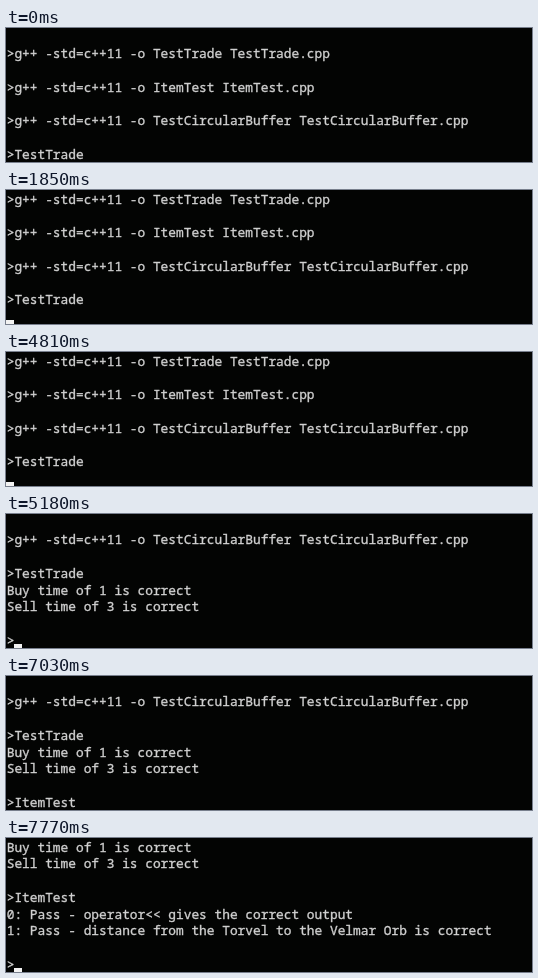
These frames come from a looping animation (526 by 134 pixels, 8 s). An HTML page:

```html
<!DOCTYPE html>
<html lang="en">
<head>
<meta charset="utf-8">
<title>Terminal session</title>
<style>
  html, body { margin: 0; width: 100%; height: 100%; overflow: hidden; background: #030403; }
  #screen {
    position: absolute; left: 0.7px; top: 0.5px; margin: 0;
    font: 12.83px/16.8px "Noto Sans Mono", "DejaVu Sans Mono", monospace;
    color: #d0d0d0; -webkit-text-stroke: 0.35px #d0d0d0; white-space: pre;
  }
  #cursor { position: absolute; top: 130px; width: 8px; height: 4px; background: #f2f2f2; }
</style>
</head>
<body>
<pre id="screen"></pre>
<div id="cursor"></div>
<script>
const LOOP = 8000, TICK = 370, ROWS = 8, CHAR_WIDTH = 7.7;

const transcript = [
  "",
  ">g++ -std=c++11 -o TestTrade TestTrade.cpp",
  "",
  ">g++ -std=c++11 -o ItemTest ItemTest.cpp",
  "",
  ">g++ -std=c++11 -o TestCircularBuffer TestCircularBuffer.cpp",
  "",
  ">TestTrade",
  "Buy time of 1 is correct",
  "Sell time of 3 is correct",
  "",
  ">ItemTest",
  "0: Pass - operator<< gives the correct output",
  "1: Pass - distance from the Torvel to the Velmar Orb is correct",
  "",
];

// Each scene shows the window of lines from `top`, ending in the input line.
// The cursor restarts its blink, visible, at the scene's first tick.
const scenes = [
  { tick: -1, top: 0, input: ">TestTrade" },
  { tick: 5, top: 1, input: "" },
  { tick: 14, top: 4, input: ">" },
  { tick: 16, top: 4, input: ">ItemTest" },
  { tick: 20, top: 5, input: "" },
  { tick: 21, top: 8, input: ">" },
];

const screenEl = document.getElementById("screen");
const cursorEl = document.getElementById("cursor");
let shown = null;

function draw() {
  const tick = Math.floor((performance.now() % LOOP) / TICK);
  const scene = scenes.findLast(s => s.tick <= tick);
  if (scene !== shown) {
    const lines = transcript.slice(scene.top, scene.top + ROWS - 1);
    screenEl.textContent = [...lines, scene.input].join("\n");
    cursorEl.style.left = scene.input.length * CHAR_WIDTH + "px";
    shown = scene;
  }
  cursorEl.style.visibility = (tick - scene.tick) % 2 ? "hidden" : "visible";
  requestAnimationFrame(draw);
}
draw();
</script>
</body>
</html>
```
